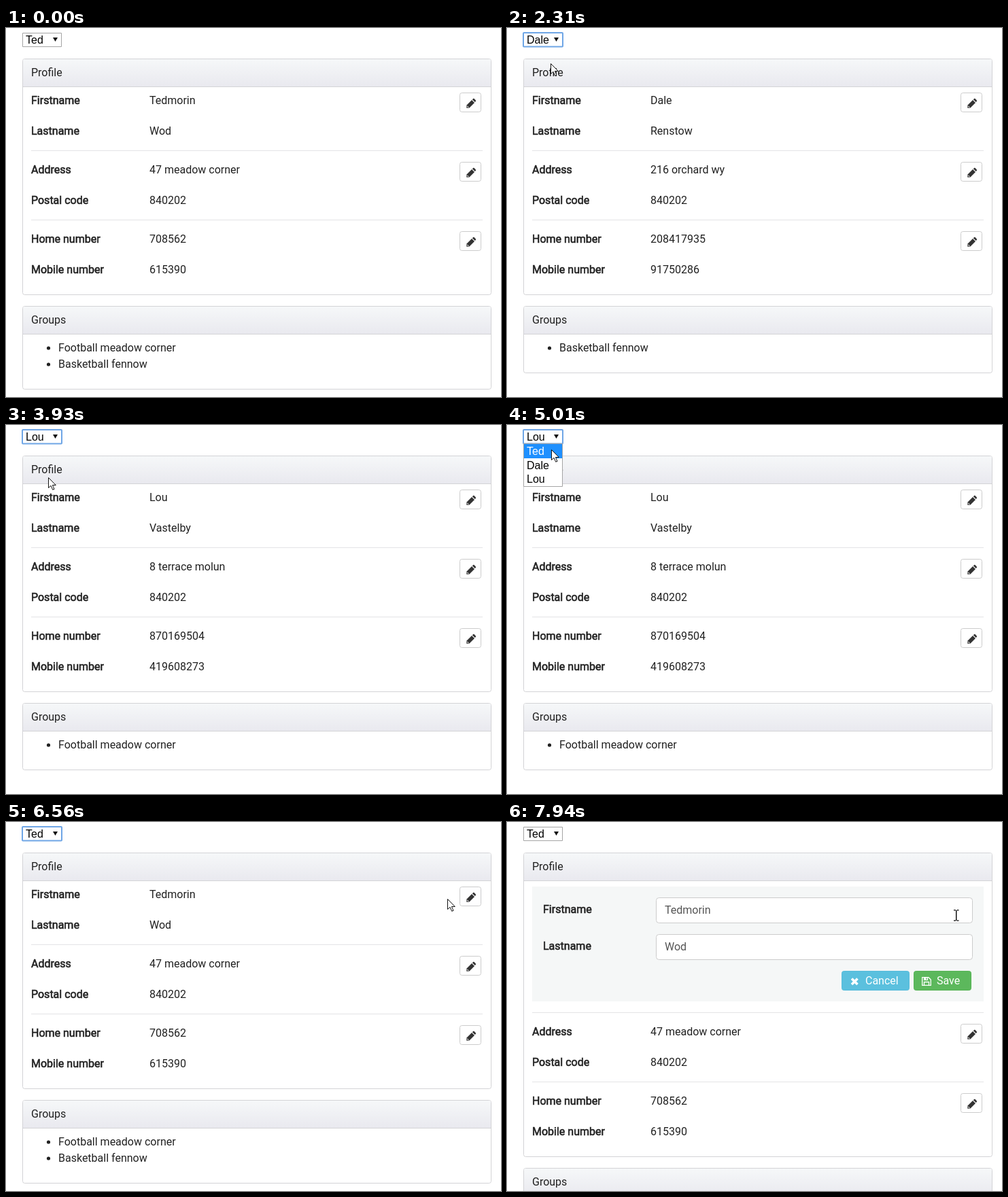
Write an HTML page with a canvas that moves like this. It is 728x543 px and loops after 8 s.

```html
<!DOCTYPE html>
<html lang="en">
<head>
<meta charset="utf-8">
<title>Profile editor</title>
<style>
html, body { margin: 0; width: 100%; height: 100%; overflow: hidden; background: #fff; }
canvas { display: block; }
</style>
</head>
<body>
<canvas id="stage" width="728" height="543"></canvas>
<script>
const ctx = document.getElementById('stage').getContext('2d');
const LOOP = 8000;
const BODY = '16px Roboto, sans-serif';
const FORM = '16px "Liberation Sans", Arial, sans-serif';

const users = [
  { nick: 'Ted', fields: ['Tedmorin', 'Wod', '47 meadow corner', '840202', '708562', '615390'],
    groups: ['Football meadow corner', 'Basketball fennow'] },
  { nick: 'Dale', fields: ['Dale', 'Renstow', '216 orchard wy', '840202', '208417935', '91750286'],
    groups: ['Basketball fennow'] },
  { nick: 'Lou', fields: ['Lou', 'Vastelby', '8 terrace molun', '840202', '870169504', '419608273'],
    groups: ['Football meadow corner'] }
];
const labels = ['Firstname', 'Lastname', 'Address', 'Postal code', 'Home number', 'Mobile number'];

const within = (t, a, b) => t >= a && t < b;
const linear = p => p;
const easeOut = p => 1 - (1 - p) * (1 - p);
const easeIn = p => Math.pow(p, 1.3);

// Pointer moves: first tick, last tick, number of ticks, waypoints, easing
const moves = [
  [70, 840, 11, [[690, 575], [639, 530], [380, 300], [120, 130], [14, 60], [37, 38]], linear],
  [910, 990, 2, [[58, 31]], linear],
  [1220, 1300, 2, [[63, 23]], linear],
  [1530, 1910, 5, [[64, 52]], easeOut],
  [2540, 2920, 6, [[67, 16]], easeOut],
  [3090, 3320, 4, [[63, 63]], linear],
  [3550, 3630, 2, [[62, 77]], linear],
  [4010, 4320, 5, [[66, 26]], easeOut],
  [4860, 5010, 3, [[65, 36]], linear],
  [5320, 5940, 9, [[459, 109]], easeIn],
  [6020, 6020, 1, [[511, 112]], linear],
  [6100, 6870, 11, [[685, 113]], easeOut],
  [7100, 7330, 4, [[681, 117]], linear],
  [7860, 7940, 2, [[660, 137]], linear]
];

function along(points, p) {
  const f = p * (points.length - 1);
  const i = Math.min(Math.floor(f), points.length - 2);
  return points[i].map((v, k) => Math.round(v + (points[i + 1][k] - v) * (f - i)));
}

function pointerAt(t) {
  let pos = null;
  for (const [start, end, ticks, points, ease] of moves) {
    if (t < start) break;
    const gap = ticks > 1 ? (end - start) / (ticks - 1) : 1;
    const tick = Math.min(ticks, Math.floor((t - start) / gap + 0.01) + 1);
    pos = along(pos ? [pos, ...points] : points, ease(tick / ticks));
  }
  return pos;
}

function text(s, x, y, color = '#212121', font = BODY) {
  ctx.font = font;
  ctx.fillStyle = color;
  ctx.fillText(s, x, y);
}

function label(s, x, y) {
  text(s, x, y);
  ctx.strokeStyle = '#212121';
  ctx.lineWidth = 0.6;
  ctx.strokeText(s, x, y);
}

function rect(x, y, w, h, color) {
  ctx.fillStyle = color;
  ctx.fillRect(x, y, w, h);
}

function box(x, y, w, h, r, fill, stroke) {
  ctx.beginPath();
  ctx.roundRect(x + 0.5, y + 0.5, w - 1, h - 1, r);
  ctx.fillStyle = fill;
  ctx.fill();
  ctx.strokeStyle = stroke;
  ctx.lineWidth = 1;
  ctx.stroke();
}

function poly(points, fill, stroke) {
  ctx.beginPath();
  points.forEach(([x, y]) => ctx.lineTo(x, y));
  ctx.closePath();
  ctx.fillStyle = fill;
  ctx.fill();
  if (stroke) {
    ctx.strokeStyle = stroke;
    ctx.lineWidth = 1;
    ctx.stroke();
  }
}

function at(x, y, draw) {
  ctx.save();
  ctx.translate(x, y);
  draw();
  ctx.restore();
}

function panel(title, y, h) {
  box(24, y, 690, h, 3, '#fff', '#d3d3d6');
  const g = ctx.createLinearGradient(0, y, 0, y + 41);
  g.addColorStop(0, '#f6f8f9');
  g.addColorStop(1, '#e9e9ef');
  ctx.beginPath();
  ctx.roundRect(25, y + 1, 688, 40, [2, 2, 0, 0]);
  ctx.fillStyle = g;
  ctx.fill();
  rect(25, y + 41, 688, 1, '#d3d3d6');
  text(title, 37, y + 26);
}

function pencil(color, gap) {
  poly([[10.5, 18.5], [18, 11], [22, 15], [14.5, 22.5], [10.3, 22.8]], color);
  poly([[18.8, 10.2], [20.3, 8.8], [21.3, 8.8], [24, 11.5], [24, 12.5], [22.7, 14]], color);
  poly([[11.6, 19.5], [13.6, 21.5], [12.7, 22], [11.3, 20.6]], gap);
}

function editButton(y, hot = 0) {
  at(667, y, () => {
    box(0, 0, 32, 29, 3, '#fff', '#ccc');
    pencil('#333', '#fff');
    if (hot > 0) {
      ctx.globalAlpha = hot;
      box(0, 0, 32, 29, 3, '#1b75b2', '#18689f');
      pencil('#fff', '#1b75b2');
    }
  });
}

function row(i, y, user) {
  label(labels[i], 37, y);
  text(user.fields[i], 211, y);
}

function input(s, y) {
  box(219, y, 466, 38, 4, '#fff', '#ccc');
  text(s, 232, y + 24, '#555');
}

function editForm(user) {
  rect(37, 95, 664, 169, '#f5f7f7');
  label(labels[0], 53, 134);
  label(labels[1], 53, 188);
  input(user.fields[0], 111);
  input(user.fields[1], 165);
  box(492, 219, 100, 29, 3, '#5bc0de', '#55bcdb');
  box(598, 219, 85, 29, 3, '#5cb85c', '#55b355');
  text('Cancel', 527, 239, '#fff');
  text('Save', 632, 239, '#fff');

  ctx.strokeStyle = '#fff';
  ctx.lineWidth = 3.6;
  ctx.beginPath();
  ctx.moveTo(507, 230.5);
  ctx.lineTo(515.5, 239);
  ctx.moveTo(515.5, 230.5);
  ctx.lineTo(507, 239);
  ctx.stroke();

  ctx.lineWidth = 1.3;
  ctx.beginPath();
  ctx.moveTo(610.7, 228.7);
  ctx.lineTo(620, 228.7);
  ctx.lineTo(623.3, 232);
  ctx.lineTo(623.3, 240.3);
  ctx.lineTo(610.7, 240.3);
  ctx.closePath();
  ctx.rect(613.5, 235.5, 7, 4.8);
  ctx.stroke();
  rect(613, 229, 6, 4, '#fff');
  rect(616.3, 229.5, 1.4, 2.5, '#5cb85c');
}

function page(user, editing, hot) {
  const dy = editing ? 100 : 0;
  panel('Profile', 45, 348 + dy);
  if (editing) {
    editForm(user);
  } else {
    row(0, 112, user);
    row(1, 157, user);
    editButton(95, hot);
  }
  for (let i = 2; i < 6; i += 2) {
    const y = dy + 51 * i + 78;
    rect(37, y, 664, 1, '#e4e4e6');
    row(i, y + 34, user);
    row(i + 1, y + 79, user);
    editButton(y + 17);
  }
  panel('Groups', 409 + dy, 75 + 24 * user.groups.length);
  user.groups.forEach((name, i) => {
    const y = 476 + dy + 24 * i;
    ctx.beginPath();
    ctx.arc(62.5, y - 5, 2.6, 0, 7);
    ctx.fillStyle = '#212121';
    ctx.fill();
    text(name, 77, y);
  });
}

function select(user, focused, hover) {
  box(24, 7, 58, 21, 0, '#fff', hover ? '#777' : '#a5a5a5');
  if (focused) {
    ctx.strokeStyle = '#6fa6e6';
    ctx.lineWidth = 2;
    ctx.beginPath();
    ctx.roundRect(24, 7, 58, 20.5, 1);
    ctx.stroke();
  }
  text(user.nick, 29, 23, '#000', FORM);
  poly([[69, 14], [76, 14], [72.5, 20]], '#111');
}

function popup(active) {
  box(24, 27, 58, 64, 0, '#fff', '#a5a5a5');
  users.forEach((u, i) => {
    const y = [28, 49, 69][i];
    if (i === active) rect(25, y, 56, 21, '#1e90ff');
    text(u.nick, 29, y + 16, i === active ? '#fff' : '#000', FORM);
  });
}

function arrow() {
  poly([[0.5, 0.5], [0.5, 15.5], [4, 12.3], [6.7, 18.3], [9, 17.3], [6.4, 11.5], [11.3, 11.5]],
    '#fff', '#111');
}

function hand() {
  ctx.beginPath();
  ctx.moveTo(-1.5, 14);
  ctx.lineTo(-1.5, 2);
  ctx.quadraticCurveTo(0, -0.8, 1.5, 2);
  ctx.lineTo(1.5, 7);
  ctx.quadraticCurveTo(4, 5.6, 4.5, 8);
  ctx.quadraticCurveTo(7, 6.8, 7.5, 9);
  ctx.quadraticCurveTo(10, 8.4, 10, 11);
  ctx.lineTo(10, 15);
  ctx.lineTo(8, 19);
  ctx.lineTo(8, 22.5);
  ctx.lineTo(-1, 22.5);
  ctx.lineTo(-1, 20);
  ctx.lineTo(-5.5, 13.5);
  ctx.quadraticCurveTo(-5.5, 10.5, -3, 11.5);
  ctx.closePath();
  ctx.fillStyle = '#fff';
  ctx.fill();
  ctx.strokeStyle = '#111';
  ctx.lineWidth = 1.1;
  ctx.stroke();
  for (const x of [1.5, 4.5, 7.5]) rect(x - 0.5, 8, 1, 4, '#111');
}

function beam() {
  rect(0, -7, 1.5, 15, '#111');
  rect(-3, -8, 3, 1.3, '#111');
  rect(1.5, -8, 3, 1.3, '#111');
  rect(-3, 7.5, 3, 1.3, '#111');
  rect(1.5, 7.5, 3, 1.3, '#111');
}

function render(t) {
  const chosen = within(t, 2310, 3930) ? 1 : within(t, 3930, 5240) ? 2 : 0;
  const user = users[chosen];
  const editing = t >= 7100;
  const pos = pointerAt(t);
  const [x, y] = pos || [-99, -99];
  const hot = Math.max(0, Math.min(1, (t - 6560) / 200));

  rect(0, 0, 728, 543, '#fff');
  page(user, editing, hot);
  select(user, within(t, 1450, 6940), within(x, 24, 82) && within(y, 7, 28));
  if (within(t, 1450, 2310) || within(t, 2920, 3930) || within(t, 4550, 5240)) {
    popup(y < 28 ? chosen : y < 49 ? 0 : y < 69 ? 1 : 2);
  }
  if (pos) {
    const overButton = within(x, 667, 699) && within(y, 95, 124);
    at(x, y, editing ? beam : overButton ? hand : arrow);
  }
}

function tick(now) {
  render(now % LOOP);
  requestAnimationFrame(tick);
}
requestAnimationFrame(tick);
</script>
</body>
</html>
```
